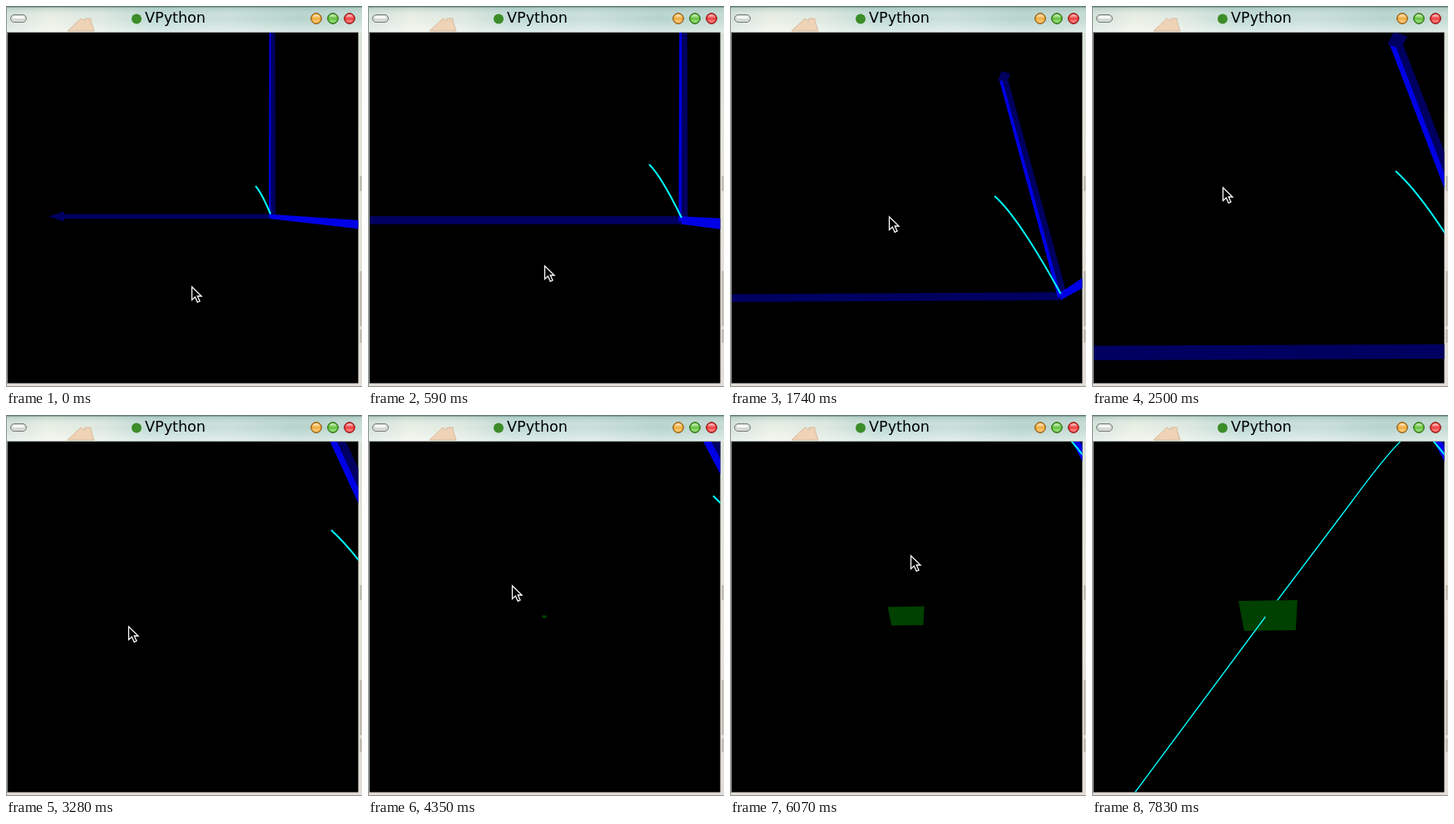
An HTML page with a canvas that plays this animation: 428x457 px, repeating every 8.64 s.

```html
<!DOCTYPE html>
<html lang="en">
<head>
<meta charset="utf-8">
<title>VPython</title>
<style>
  html, body { margin: 0; width: 100%; height: 100%; overflow: hidden; background: #000; }
  svg, canvas { position: absolute; left: 0; top: 0; width: 428px; height: 457px; }
  text { font: 17.6px "DejaVu Sans", sans-serif; }
</style>
</head>
<body>
<svg viewBox="0 0 428 457">
  <defs>
    <linearGradient id="bar">
      <stop offset="0" stop-color="#d3e2d9"/>
      <stop offset=".12" stop-color="#e9efe4"/>
      <stop offset=".27" stop-color="#dce8df"/>
      <stop offset=".42" stop-color="#bcd9d3"/>
      <stop offset=".62" stop-color="#c9dfda"/>
      <stop offset=".82" stop-color="#b4d2cb"/>
      <stop offset="1" stop-color="#c3dad2"/>
    </linearGradient>
    <linearGradient id="shade" x2="0" y2="1">
      <stop offset="0" stop-color="#7fa89f" stop-opacity=".5"/>
      <stop offset=".45" stop-color="#fff" stop-opacity="0"/>
      <stop offset="1" stop-color="#fff" stop-opacity=".5"/>
    </linearGradient>
    <linearGradient id="gloss" x2="0" y2="1">
      <stop offset="0" stop-color="#fff" stop-opacity=".85"/>
      <stop offset=".5" stop-color="#fff" stop-opacity=".1"/>
      <stop offset="1" stop-color="#fff" stop-opacity=".55"/>
    </linearGradient>
    <linearGradient id="side" x2="0" y2="1">
      <stop offset="0" stop-color="#d9e3da"/>
      <stop offset=".4" stop-color="#e6e4da"/>
      <stop offset="1" stop-color="#e2ddd8"/>
    </linearGradient>
    <g id="button">
      <circle r="6.3"/>
      <ellipse rx="5" ry="4.8" fill="url(#gloss)" stroke="none"/>
    </g>
  </defs>
  <rect width="428" height="457" fill="url(#side)"/>
  <rect width="428" height="32" fill="url(#bar)"/>
  <rect width="428" height="32" fill="url(#shade)"/>
  <path d="M74 30L90 15L95 18V15H102V18L106 30Z" fill="#efd3b6" stroke="#d9b99c"/>
  <path d="M0 .75H428" stroke="#5f7a70" stroke-width="1.5"/>
  <path d="M.5 1V457" stroke="#8b908c"/>
  <path d="M1.5 32V453M1 31.5H424" stroke="#9ba39c"/>
  <path d="M426.5 204v18M426.5 318v66M426.5 388v16" stroke="#b9b5ab" stroke-width="2"/>
  <path d="M0 456.5H428" stroke="#8f918c"/>
  <rect x="2" y="32" width="421.5" height="420.5"/>
  <rect x="5.5" y="10.5" width="19" height="9" rx="4.5" fill="#d5d9d5" stroke="#757d78"/>
  <rect x="8" y="12" width="14" height="3" rx="1.5" fill="#f6f8f5"/>
  <circle cx="157" cy="15.5" r="6" fill="#3c8c28"/>
  <text x="167" y="20">VPython</text>
  <use href="#button" x="373" y="15" fill="#f0a020" stroke="#7a4a10"/>
  <use href="#button" x="393" y="15" fill="#4fba22" stroke="#2a5a14"/>
  <use href="#button" x="413" y="15" fill="#ee2626" stroke="#7c1414"/>
</svg>
<canvas id="view" width="428" height="457"></canvas>
<script>
const ctx = document.getElementById('view').getContext('2d');
const LOOP = 8640, STEP = 57.75;
const DARK = '#000060', BLUE = '#0000e6', CYAN = '#00ffff', GREEN = '#004000';

// The view only moves while the mouse drags; it rests in these spans.
const rests = [[500, 940], [3100, 3620], [4520, 5360]];

// Camera poses: view time, foot x y, tip x y, beam width, ball x y.
const poses = [
  [0, 320, 252.5, 320, -10, 8, 300, 216],
  [500, 379, 257, 379, 0, 11, 338, 190],
  [775, 379.5, 286, 358.3, 10, 11, 328, 191],
  [1294, 399.5, 348, 328.5, 87, 11, 318, 228],
  [2045, 507, 414, 365, 44, 17, 365, 198],
  [2660, 602, 472, 389, 10, 20, 391, 138],
  [3373, 650, 480, 402, 10, 22, 415, 97],
  [4266, 658, 480, 410, 10, 22, 398, 18]
];

// Mouse strokes: time, x, y.
const strokes = [
  [0, 223, 336], [450, 215, 290], [950, 202, 372], [1215, 197, 318],
  [1734, 191, 252], [2485, 157, 217], [3050, 150, 180], [3600, 142, 397],
  [4500, 180, 160], [5340, 190, 366], [6066, 217, 168], [7100, 202, 94],
  [7440, 202, 94], [7830, 326, 456]
];

const clamp = u => Math.min(1, Math.max(0, u));
const mix = (a, b, u) => a + (b - a) * u;

function at(keys, t) {
  const i = keys.findIndex(k => k[0] > t);
  if (i < 0) return keys[keys.length - 1].slice(1);
  const a = keys[i - 1], b = keys[i], u = (t - a[0]) / (b[0] - a[0]);
  return a.slice(1).map((v, k) => mix(v, b[k + 1], u));
}

const viewTime = t => rests.reduce((v, [from, to]) => v - clamp((t - from) / (to - from)) * (to - from), t);

function poly(color, ...p) {
  ctx.fillStyle = color;
  ctx.beginPath();
  for (let i = 0; i < p.length; i += 2) ctx.lineTo(p[i], p[i + 1]);
  ctx.closePath();
  ctx.fill();
}

// Beam with upright ends of height h1 and h2.
function beam(color, x1, y1, h1, x2, y2, h2) {
  poly(color, x1, y1 - h1 / 2, x2, y2 - h2 / 2, x2, y2 + h2 / 2, x1, y1 + h1 / 2);
}

function drawAxes(fx, fy, tx, ty, w) {
  const lean = (fx - tx) / (fy - ty);
  const h = 1.33 * w - 5.2;

  const left = fx - 250 * (w / 8) ** 2;
  const leftY = fy + 0.025 * lean * fx;
  beam(DARK, left, leftY, h, fx, fy, h);
  poly(DARK, left - 3.5 * h, leftY, left, leftY - 1.1 * h, left, leftY + 1.1 * h);

  // The upright shows a lit face on its left and a shaded one on its right.
  const split = 0.3 + 0.3 * lean - 0.5, top = w * 0.85;
  const face = (color, a, b) =>
    poly(color, tx + a * top, ty - a * 4, tx + b * top, ty - b * 4, fx + b * w, fy - b * 4, fx + a * w, fy - a * 4);
  face(DARK, split, 0.5);
  face(BLUE, -0.5, split);
  ctx.save();
  ctx.translate(tx, ty);
  ctx.rotate(lean);
  poly(DARK, -0.4 * w, -0.7 * w, 0.6 * w, -0.7 * w, 0.5 * w, 0.3 * w, -0.5 * w, 0.3 * w);
  ctx.restore();

  const slope = 0.093 - 2.6 * lean, tall = h * Math.hypot(1, slope);
  beam(BLUE, fx - 2, fy, h, fx + 110, fy + 110 * slope, 1.9 * tall);
}

function drawTrail(fx, fy, x, y) {
  const dx = fx - 2 - x, dy = fy - 3 - y;
  ctx.lineWidth = 2;
  ctx.beginPath();
  ctx.moveTo(x, y);
  ctx.quadraticCurveTo(x + 0.25 * dx + 0.068 * dy, y + 0.25 * dy - 0.068 * dx, x + dx, y + dy);
  ctx.stroke();
}

function drawCrate(v) {
  const s = mix(0.085, 1, Math.min(1, (v - 3373) / 1527));
  if (s <= 0) return;
  ctx.save();
  ctx.translate(212, 242);
  ctx.scale(s, s);
  poly(GREEN, -36, -19, 35, -20, 33, 16, -29, 17);
  ctx.restore();
}

// Far part of the throw, revealed down to the ball's height.
function drawFall(t, path) {
  const u = clamp((t - 6400) / 620);
  if (!u) return;
  ctx.save();
  ctx.beginPath();
  ctx.rect(0, 0, 428, 32 + 421 * u ** 1.5);
  ctx.clip();
  ctx.lineWidth = 1.3;
  ctx.stroke(new Path2D(path));
  ctx.restore();
}

function drawPointer(t) {
  const [x, y] = at(strokes, t).map(Math.round);
  const arrow = new Path2D('M.5 .8V16.5L4.3 13L7.2 19.3L10 18L7.2 12H12Z');
  ctx.save();
  ctx.translate(x, y);
  ctx.fillStyle = '#000';
  ctx.strokeStyle = '#fff';
  ctx.lineWidth = 1.3;
  ctx.fill(arrow);
  ctx.stroke(arrow);
  ctx.restore();
}

function draw(time) {
  const t = time < 60 ? 0 : 60 + Math.floor((time - 60) / STEP) * STEP;
  const v = viewTime(t);
  const [fx, fy, tx, ty, w, bx, by] = at(poses, v);
  ctx.clearRect(0, 0, 428, 457);
  ctx.save();
  ctx.beginPath();
  ctx.rect(2, 32, 421.5, 420.5);
  ctx.clip();
  ctx.strokeStyle = CYAN;
  drawAxes(fx, fy, tx, ty, w);
  drawTrail(fx, fy, bx, by);
  drawFall(t, 'M371 31.5Q352 50 310 107L208 242');
  drawCrate(v);
  drawFall(t, 'M208.5 242L51.5 453');
  ctx.restore();
  if (time < 7830) drawPointer(t);
}

const start = performance.now();
function tick() {
  draw((performance.now() - start) % LOOP);
  requestAnimationFrame(tick);
}
tick();
</script>
</body>
</html>
```
